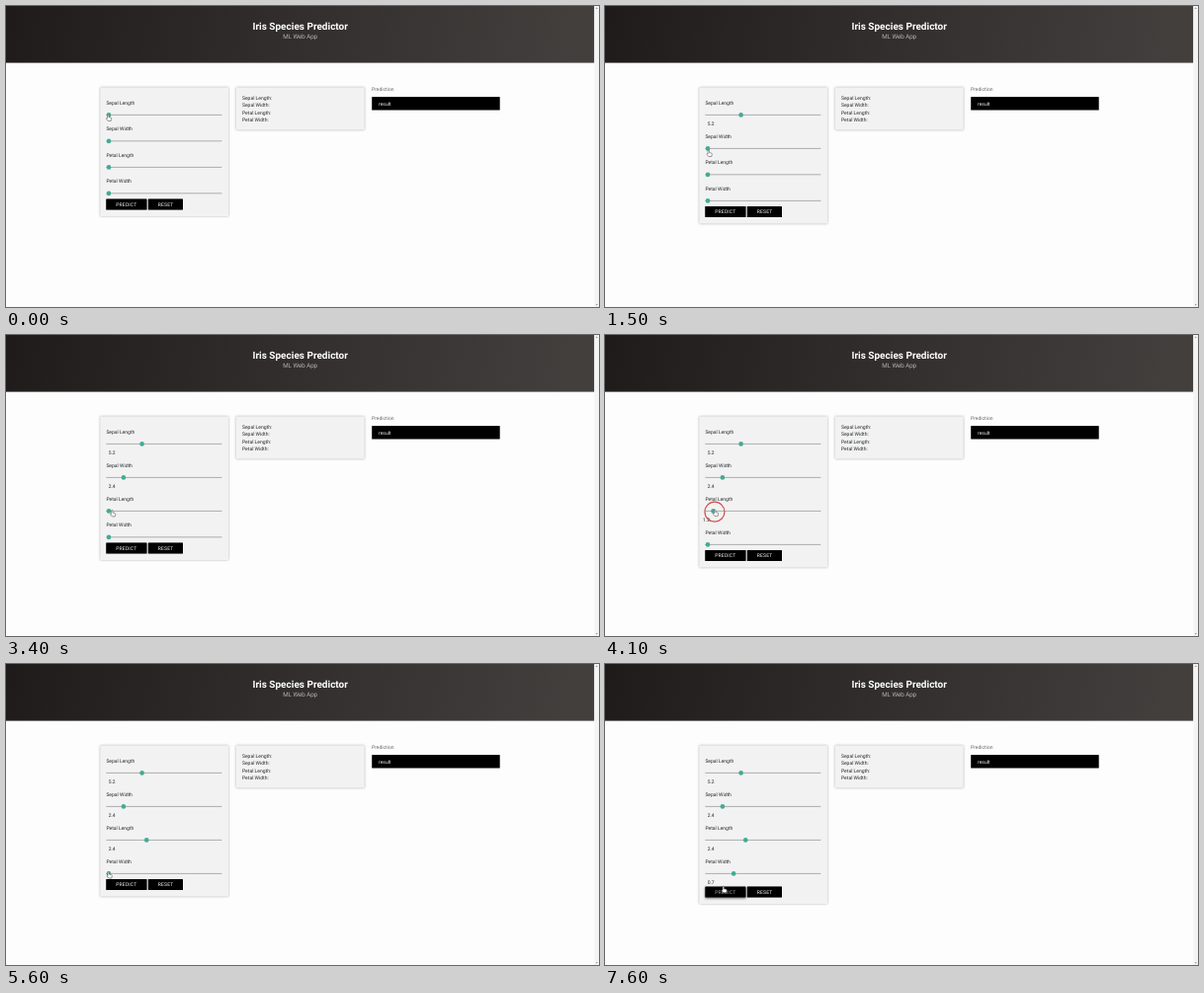
Write an HTML page that moves like this. It is 600 px wide and 305 px high and loops after 8000 ms.

```html
<!DOCTYPE html>
<html lang="en">
<head>
<meta charset="utf-8">
<title>Iris Species Predictor</title>
<style>
  html, body { margin: 0; width: 100%; height: 100%; overflow: hidden; background: #fdfdfd; }
  svg { display: block; width: 100vw; height: 100vh; }
  text { font: 5px Roboto, sans-serif; fill: #25282b; text-rendering: geometricPrecision; }
  .title { font-size: 10px; font-weight: 700; fill: #fff; text-anchor: middle; }
  .lead { font-size: 6.25px; font-weight: 300; fill: #f4f4f4; text-anchor: middle; }
  .muted { fill: #666; }
  .light, .button text { fill: #f4f4f4; }
  .button text { letter-spacing: .167px; }
  .card { fill: #f2f2f2; filter: drop-shadow(0 .7px 1px rgba(0, 0, 0, .32)); }
  .button rect { filter: drop-shadow(0 .6px .6px rgba(0, 0, 0, .35)); }
  .button.hover rect { filter: drop-shadow(0 1.3px 1.3px rgba(0, 0, 0, .55)); }
  .button.active text { fill: #a5a5a5; }
  .track { fill: #a6a6a6; }
  .knob { fill: #42ab94; }
  .ring { fill: none; stroke: #cb504b; stroke-width: 1.2; }
  .cursor { fill: #fff; stroke: #4a4a4a; stroke-width: .55; stroke-linejoin: round; }
</style>
</head>
<body>
<svg id="stage" viewBox="0 0 600 305" preserveAspectRatio="none">
  <defs>
    <linearGradient id="dusk" gradientUnits="userSpaceOnUse" x1="0" y1="0" x2="560" y2="110">
      <stop offset="0" stop-color="#1f1b1b"/>
      <stop offset=".5" stop-color="#312e2d"/>
      <stop offset="1" stop-color="#423f3d"/>
    </linearGradient>
  </defs>
  <rect width="595.3" height="57.6" fill="url(#dusk)"/>
  <rect x="595.3" width="4.7" height="305" fill="#f4f4f4"/>
  <path d="M596.6 2.8l1.1-1.4 1.1 1.4zM596.6 302.2l1.1 1.4 1.1-1.4z" fill="#777"/>
  <text class="title" x="297.7" y="24.2">Iris Species Predictor</text>
  <text class="lead" x="297.7" y="33.4">ML Web App</text>
  <rect class="card" x="232.7" y="82.6" width="130" height="42.8" rx=".7"/>
  <text class="muted" x="370" y="86.4">Prediction</text>
  <rect x="370.2" y="92.1" width="129.5" height="13.4"/>
  <text class="light" x="377" y="100.5">result</text>
</svg>
<script>
const LOOP = 8000, STEP = 100, ROW = 26.5, LINE = 7.5;
const stage = document.getElementById('stage');

const sliders = [
  { name: 'Sepal Length', min: 4, max: 8, keys: [[300, 4], [800, 4.7], [1100, 5.2]], ringOff: 1200, blur: 1400 },
  { name: 'Sepal Width', min: 2, max: 5, keys: [[2400, 2], [3100, 2.4]], ringOff: 3200, blur: 3200 },
  { name: 'Petal Length', min: 1, max: 5.1, keys: [[4000, 1], [4600, 2.4]], ringOff: 4700, blur: 4900 },
  { name: 'Petal Width', min: 0, max: 3, keys: [[5800, 0], [6200, .7]], ringOff: 6200, blur: 6300 }
];

// time, fingertip x, fingertip y
const cursorKeys = [
  [300, 103.2, 110], [800, 129, 110], [1100, 138.8, 110], [1300, 138.8, 110],
  [1500, 104.8, 146], [1600, 104.8, 146], [2000, 105.2, 144], [2400, 105.2, 144],
  [3100, 118, 144], [3200, 118, 144], [3400, 107.3, 177.4], [3500, 107.3, 177.4],
  [3800, 105, 177], [4000, 105, 177], [4600, 142, 176.6], [4800, 142, 176.6],
  [5100, 103.8, 214], [5300, 103.8, 214], [5600, 103.8, 210.5], [5800, 103.8, 210.5],
  [6200, 129.2, 208.2], [6500, 129.2, 208.2], [6800, 119.8, 225.2]
];

function add(parent, tag, attrs, content = '') {
  const node = document.createElementNS('http://www.w3.org/2000/svg', tag);
  set(node, attrs);
  node.textContent = content;
  return parent.appendChild(node);
}

function set(node, attrs) {
  for (const name in attrs) node.setAttribute(name, attrs[name]);
}

function show(node, visible) {
  node.setAttribute('visibility', visible ? 'visible' : 'hidden');
}

// Linear interpolation of one column in a list of timed keys.
function at(keys, t, column = 1) {
  const next = keys.findIndex(key => key[0] > t);
  if (next === 0) return keys[0][column];
  if (next < 0) return keys[keys.length - 1][column];
  const a = keys[next - 1], b = keys[next];
  return a[column] + (b[column] - a[column]) * (t - a[0]) / (b[0] - a[0]);
}

function addButton(x, width, label) {
  const group = add(stage, 'g', { class: 'button' });
  add(group, 'rect', { x, y: 195.5, width, height: 11, rx: .5 });
  add(group, 'text', { x: x + 10, y: 202.8 }, label);
  return group;
}

sliders.forEach(({ name }, i) => add(stage, 'text', { x: 239, y: 94.7 + i * LINE }, name + ':'));

const panel = add(stage, 'rect', { class: 'card', x: 95.3, y: 82.6, width: 129.8, rx: .7 });
for (const slider of sliders) {
  slider.group = add(stage, 'g', {});
  add(slider.group, 'text', { x: 101.4, y: 99.6 }, slider.name);
  add(slider.group, 'rect', { class: 'track', x: 101.4, y: 109.9, width: 117, height: .9 });
  slider.knob = add(slider.group, 'circle', { class: 'knob', cy: 110.4, r: 2.3 });
  slider.label = add(slider.group, 'text', { y: 121.1 });
}
const predict = addButton(101.3, 41.2, 'PREDICT');
const reset = addButton(143.8, 35.2, 'RESET');
const ring = add(stage, 'circle', { class: 'ring', r: 10 });
const cursor = add(stage, 'path', {
  class: 'cursor',
  d: 'M-.7 4V.7a.7.7 0 0 1 1.4 0V2.6l2.1.5q.8.3.7 1.1L3 6.5H-.1L-1.9 4.2q.3-.8 1.2-.2Z'
});

function draw(t) {
  let opened = 0, ringVisible = false;
  sliders.forEach((slider, i) => {
    const { min, max, keys, ringOff, blur } = slider;
    const y = i * ROW + opened * LINE;
    const value = Math.round(at(keys, t) * 10) / 10;
    const x = 104 + 112 * (value - min) / (max - min);
    const open = t >= keys[0][0];
    set(slider.group, { transform: `translate(0 ${y})` });
    set(slider.knob, { cx: x });
    set(slider.label, { x: t < blur ? 99 : 103.7 });
    slider.label.textContent = open ? value : '';
    if (open) opened++;
    if (open && t < ringOff) {
      ringVisible = true;
      set(ring, { cx: x + 1.5, cy: y + 111.2 });
    }
  });
  show(ring, ringVisible);

  const shift = opened * LINE;
  set(panel, { height: 130.3 + shift });
  for (const button of [predict, reset]) set(button, { transform: `translate(0 ${shift})` });
  predict.classList.toggle('hover', t >= 7000);
  predict.classList.toggle('active', t >= 7400);
  set(cursor, { transform: `translate(${at(cursorKeys, t)} ${at(cursorKeys, t, 2)})` });
}

const start = performance.now();
function tick() {
  const elapsed = (performance.now() - start) % LOOP;
  draw(Math.floor(elapsed / STEP) * STEP);
  requestAnimationFrame(tick);
}
tick();
</script>
</body>
</html>
```
